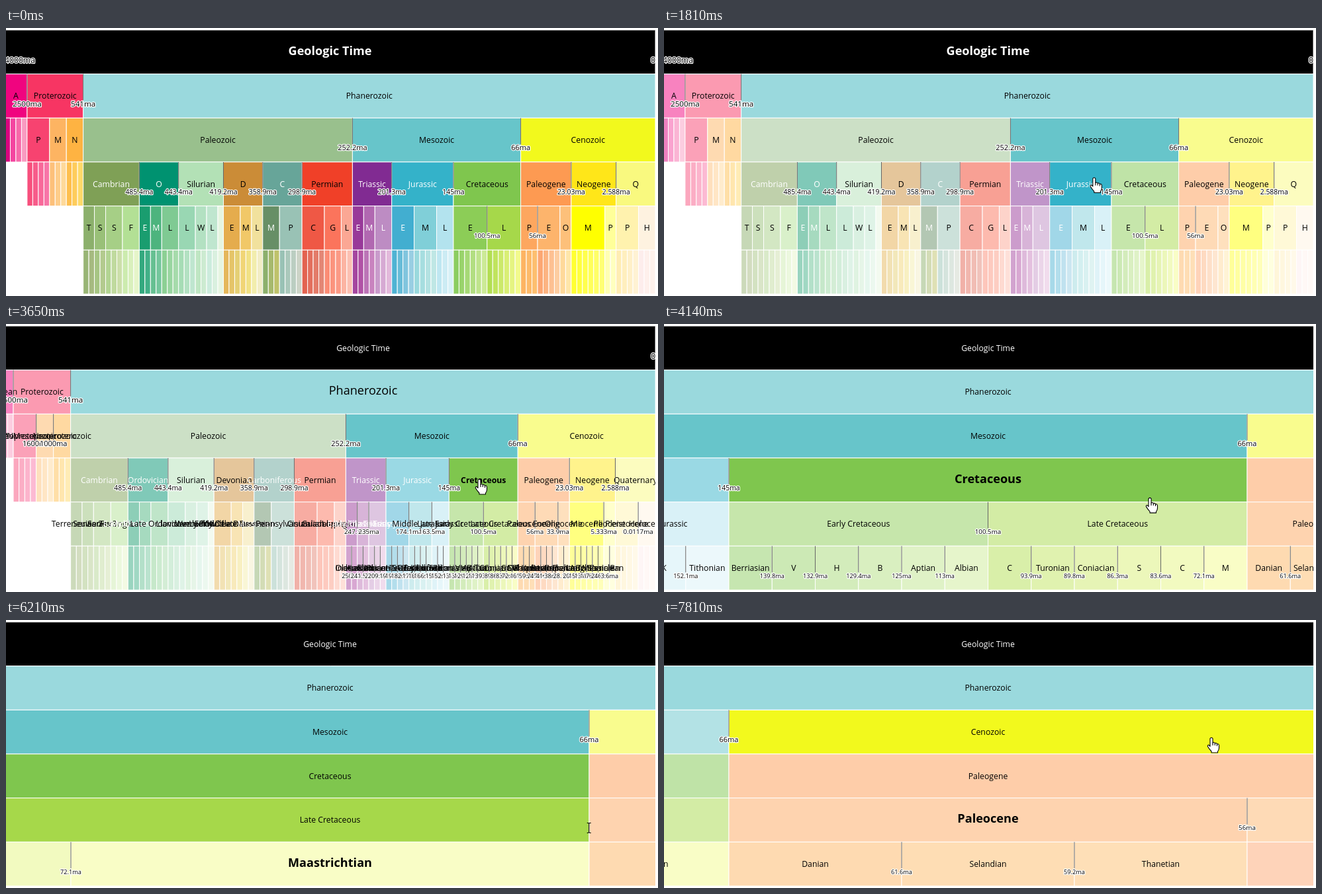
An HTML page with a canvas that plays this animation: 985x406 px, repeating every 8 s.

```html
<!DOCTYPE html>
<html lang="en">
<head>
<meta charset="utf-8">
<title>Geologic Time</title>
<style>
html, body { margin: 0; width: 100%; height: 100%; overflow: hidden; background: #fff; }
canvas { display: block; width: 985px; height: 406px; }
</style>
</head>
<body>
<canvas id="stage"></canvas>
<script>
const WIDTH = 985, HEIGHT = 406, LOOP = 8000;
const LEFT = -2, RIGHT = 981, MARGIN = 100;
const TOP = 3, ROW = 400 / 6;
const ZOOM_MS = 400, HOVER_LAG = 60;
const SMALL = 12.25, LARGE = 18.1, FAMILY = '"Open Sans", "Noto Sans", sans-serif';

// Indent = level. Name, colour, start age; then the colour ramp and the stages (or their count).
// "*" marks white text, "+" a name that needs extra room.
const CHART = `
Geologic Time* 000000
 Archean F0047F
  Eoarchean DA037F
  Paleoarchean F4449F
  Mesoarchean F768A9
  Neoarchean F99BC1
 Proterozoic F73563 2500
  Paleoproterozoic F74370 | F74F7C F875A7 4
  Mesoproterozoic FDB462 1600 | FDC07A FED99A 3
  Neoproterozoic FEB342 1000 | FEBF4E FED96A 3
 Phanerozoic 9AD9DD 541
  Paleozoic 99C08D
   Cambrian* 7FA056
    Terreneuvian 8CB06C | 99B575 A6BA80 2
    Series 2 99C078 | A6C583 B3CA8E 2
    Series 3 A6CF86 | B3D492 CCDFAA 3
    Furongian B3E095 | CCEBAE E6F5C9 3
   Ordovician* 009270 485.4
    Early Ordovician* 1A9D6F | 33A97E 41B087 2
    Middle Ordovician* 4DB47E | 66C092 74C69C 2
    Late Ordovician 7FCA93 | 8CD094 A6DBAB 3
   Silurian B3E1B6 443.4
    Llandovery 99D7B3 | A6DCB5 BFE6CF 3
    Wenlock B3E1C2 | BFE6C3 CCEBD1 2
    Ludlow BFE6CF | CCECDD D9F0DF 2
    Pridoli E6F5E1 | E6F5E1 E6F5E1 1
   Devonian+ CB8C37 419.2
    Early Devonian E5AC4D | E5B75A E5D075 3
    Middle Devonian F1C868 | F1D576 F1E185 2
    Late Devonian F1E19D | F2EDAD F2EDC5 2
   Carboniferous* 67A599 358.9
    Mississippian* 678F66 | 8CB06C BFC26B 3
    Pennsylvanian 99C2B5 | 99C2B5 CCD4C7 4
   Permian F04028 298.9
    Cisuralian EF5845 | E36350 E38776 4
    Guadalupian FB745C | FB8D76 FB9A85 3
    Lopingian FBA794 | FCB4A2 FCC0B2 2
  Mesozoic 67C5CA 252.2
   Triassic* 812B92
    Early Triassic* 983999 | A4469F B051A5 Induan,Olenekian 250
    Middle Triassic* B168B1 247.1 | BC75B7 C983BF Anisian,Ladinian 241.5
    Late Triassic* BD8CC3 235 | C99BCB E3B9DB Carnian,Norian 228,Rhaetian 209.5
   Jurassic* 34B2C9 201.3
    Early Jurassic* 42AED0 | 4EB3D3 99CEE3 Hettangian,Sinemurian 199.3,Pliensbachian 190.8,Toarcian 182.7
    Middle Jurassic 80CFD8 174.1 | 9AD9DD BFE7E5 Aalenian,Bajocian 170.3,Bathonian 168.3,Callovian 166.1
    Late Jurassic B3E3EE 163.5 | BFE7F1 D9F1F7 Oxfordian,Kimmeridgian 157.3,Tithonian 152.1
   Cretaceous 7FC64E 145
    Early Cretaceous 8CCD57 | 8CCD60 CCEA97 Berriasian,Valanginian 139.8,Hauterivian 132.9,Barremian+ 129.4,Aptian 125,Albian 113
    Late Cretaceous A6D84A 100.5 | B3DE53 F2FA8C Cenomanian,Turonian 93.9,Coniacian 89.8,Santonian+ 86.3,Campanian 83.6,Maastrichtian 72.1
  Cenozoic F2F91D 66
   Paleogene FD9A52
    Paleocene FDA75F | FDB462 FDBF6F Danian,Selandian 61.6,Thanetian 59.2
    Eocene FDB46C 56 | FCA773 FDCDA1 Ypresian,Lutetian 47.8,Bartonian 41.3,Priabonian 38
    Oligocene FDC07A 33.9 | FED99A FEE6AA Rupelian,Chattian 28.1
   Neogene FFE619 23.03
    Miocene FFFF00 | FFFF33 FFFF73 Aquitanian,Burdigalian 20.44,Langhian 15.97,Serravallian 13.82,Tortonian 11.62,Messinian 7.246
    Pliocene FFFF99 5.333 | FFFFB3 FFFFBF Zanclean,Piacenzian 3.6
   Quaternary F9F97F 2.588
    Pleistocene FFF2AE | FFEDB3 FFF2D3 4
    Holocene FEF2E0 0.0117 | FDEDEC FEF2EC 3`;

const LINE = /^( *)([A-Za-z0-9 ]+)([*+]?) ([\dA-F]{6})(?: ([\d.]+))?(?: \| ([\dA-F]{6}) ([\dA-F]{6}) (.+))?$/;

const lerp = (a, b, p) => a + (b - a) * p;
const rgb = hex => [0, 2, 4].map(i => parseInt(hex.substr(i, 2), 16));
const mix = (a, b, p) => a.map((v, i) => Math.round(lerp(v, b[i], p)));
const css = c => `rgb(${c})`;
const WHITE = [255, 255, 255];

const nodes = [];
const byName = {};

function addNode(parent, name, flag, color, age) {
  const node = {
    parent, name, age, color, kids: [],
    depth: parent ? parent.depth + 1 : 0,
    first: !parent || !parent.kids.length,
    ink: flag === '*' ? '#fff' : '#000',
    pad: flag === '+' ? 10 : 6,
    pale: mix(color, WHITE, 0.5)
  };
  if (parent) parent.kids.push(node);
  nodes.push(node);
  byName[name] = node;
  return node;
}

function addStages(series, from, to, list) {
  const items = /^\d+$/.test(list) ? Array(+list).fill('') : list.split(',');
  items.forEach((item, i) => {
    const [, name, flag, age] = item.match(/^([A-Za-z]*)(\+?) ?([\d.]*)$/);
    const p = items.length > 1 ? i / (items.length - 1) : 0;
    addNode(series, name, flag, mix(rgb(from), rgb(to), p), age);
  });
}

function parse() {
  const path = [];
  for (const line of CHART.trim().split('\n')) {
    const [, indent, name, flag, color, age, from, to, list] = line.match(LINE);
    const depth = indent.length;
    path[depth] = addNode(path[depth - 1], name, flag, rgb(color), age);
    if (list) addStages(path[depth], from, to, list);
  }
}

// Every leaf takes one unit of width.
function partition(node, start) {
  node.a = start;
  node.b = node.kids.length ? node.kids.reduce((at, kid) => partition(kid, at), start) : start + 1;
  return node.b;
}

parse();
const root = nodes[0];
partition(root, 0);

function holds(node, inner) {
  for (; inner; inner = inner.parent) if (inner === node) return true;
  return false;
}

const zooms = [
  [-ZOOM_MS, root],
  [2603, byName.Phanerozoic],
  [3640, byName.Cretaceous],
  [4620, byName['Late Cretaceous']],
  [5450, byName.Maastrichtian],
  [6300, byName.Paleocene]
];

// Time, then the tip of the pointer.
const pointerPath = [
  [300, 1000, 300], [450, 960, 290], [1080, 720, 50], [1200, 700, 60],
  [1810, 650, 227], [1930, 630, 170], [1990, 621, 124], [2300, 619, 121],
  [2670, 619, 121], [2910, 638, 184], [3400, 715, 235], [4000, 715, 235],
  [4140, 734, 263], [4380, 740, 290], [4630, 740, 290], [4870, 756, 345],
  [5350, 800, 372], [6030, 800, 372], [6210, 880.5, 315], [6290, 900, 310],
  [6900, 900, 310], [7070, 1010, 270], [7400, 1010, 240], [7690, 850, 185],
  [7810, 827, 178], [LOOP, 827, 178]
];

function pointerAt(t) {
  const next = pointerPath.findIndex(k => k[0] > t);
  if (next === 0) return [1010, 300];
  const [t0, x0, y0] = pointerPath[next - 1];
  const [t1, x1, y1] = pointerPath[next];
  const p = (t - t0) / (t1 - t0);
  return [lerp(x0, x1, p), lerp(y0, y1, p)];
}

const easeCubic = t => t < 0.5 ? 4 * t ** 3 : 1 - 4 * (1 - t) ** 3;

function zoomAt(t) {
  let i = zooms.length - 1;
  while (zooms[i][0] > t) i--;
  const p = easeCubic(Math.min(1, (t - zooms[i][0]) / ZOOM_MS));
  return { from: zooms[Math.max(0, i - 1)][1], to: zooms[i][1], p };
}

function place(node, focus) {
  const lo = focus.a === root.a ? LEFT : LEFT + MARGIN;
  const hi = focus.b === root.b ? RIGHT : RIGHT - MARGIN;
  const k = (hi - lo) / (focus.b - focus.a);
  const x0 = lo + (node.a - focus.a) * k;
  const x1 = lo + (node.b - focus.a) * k;
  return {
    x0, x1,
    cx: holds(node, focus) ? (lo + hi) / 2 : (x0 + x1) / 2,
    size: node === focus ? LARGE : SMALL
  };
}

function layout({ from, to, p }) {
  return nodes.map(node => {
    const a = place(node, from), b = place(node, to);
    const cell = { node, y: TOP + node.depth * ROW, room: b.x1 - b.x0 };
    for (const key in b) cell[key] = lerp(a[key], b[key], p);
    return cell;
  });
}

const canvas = document.getElementById('stage');
const ctx = canvas.getContext('2d');
const ratio = window.devicePixelRatio || 1;
canvas.width = WIDTH * ratio;
canvas.height = HEIGHT * ratio;

function textWidth(text, size) {
  ctx.font = `${size}px ${FAMILY}`;
  return ctx.measureText(text).width;
}

function drawCell({ node, x0, x1, y }, hovered) {
  ctx.fillStyle = css(!hovered || holds(node, hovered) ? node.color : node.pale);
  ctx.fillRect(x0, y, x1 - x0, ROW);
  ctx.strokeStyle = '#fff';
  ctx.lineWidth = 1;
  ctx.strokeRect(x0, y, x1 - x0, ROW);
}

function drawName({ node, cx, y, size, room }, focus) {
  const fits = textWidth(node.name, SMALL) + node.pad < room;
  if (!fits && room < 12) return;
  ctx.font = `${node === focus ? 700 : 400} ${size}px ${FAMILY}`;
  ctx.textAlign = 'center';
  ctx.fillStyle = node.ink;
  ctx.fillText(fits ? node.name : node.name.charAt(0), cx, y + ROW / 2 + 4.3);
}

function drawTick(x, y, depth, label, align) {
  const size = 12.2 - 0.6 * depth;
  const base = y + 45.2 + 0.36 * size;
  ctx.strokeStyle = '#666';
  ctx.lineWidth = 1;
  ctx.beginPath();
  ctx.moveTo(x, y);
  ctx.lineTo(x, y + 40);
  ctx.stroke();
  ctx.font = `${size}px ${FAMILY}`;
  ctx.textAlign = align;
  ctx.lineJoin = 'round';
  ctx.lineWidth = 2.5;
  ctx.strokeStyle = '#fff';
  ctx.strokeText(label, x, base);
  ctx.fillStyle = '#000';
  ctx.fillText(label, x, base);
}

function drawAge({ node, x0, y, room }) {
  if (node.first || !node.age) return;
  const label = node.age + 'ma';
  if (textWidth(label, 12.2 - 0.6 * node.depth) + 4 < room) drawTick(x0, y, node.depth, label, 'center');
}

const hand = new Path2D('M-2 1.5 Q0 -1 2 1.5 V8 Q4 6.5 5.3 8.8 Q7.4 7.6 8.5 10 Q11 9 11.5 12 V16 Q11.3 19 9.5 21 V23 H0 V21 Q-3 18 -5.6 13.5 Q-6 11 -3.8 11.5 L-2 13.4 Z');
const fingers = new Path2D('M2 8 V12 M5.3 9 V12 M8.5 10 V13');
const beam = new Path2D('M-3 -7.5 H-1 L0 -6.5 L1 -7.5 H3 M0 -6.5 V6.5 M-3 7.5 H-1 L0 6.5 L1 7.5 H3');

function drawPointer(t) {
  const [x, y] = pointerAt(t);
  ctx.save();
  ctx.translate(x, y);
  ctx.strokeStyle = '#000';
  ctx.lineWidth = 1.1;
  if (t > 6150 && t < 6260) {
    ctx.stroke(beam);
  } else {
    ctx.fillStyle = '#fff';
    ctx.fill(hand);
    ctx.stroke(hand);
    ctx.stroke(fingers);
  }
  ctx.restore();
}

function hoveredAt(t, cells) {
  const [x, y] = pointerAt(Math.max(0, t - HOVER_LAG));
  if (x > RIGHT) return null;
  const hit = cells.find(c => x >= c.x0 && x < c.x1 && y >= c.y && y < c.y + ROW);
  return hit ? hit.node : null;
}

function draw(t) {
  const zoom = zoomAt(t);
  const cells = layout(zoom);
  const hovered = hoveredAt(t, cells);
  ctx.setTransform(ratio, 0, 0, ratio, 0, 0);
  ctx.fillStyle = '#fff';
  ctx.fillRect(0, 0, WIDTH, HEIGHT);
  ctx.save();
  ctx.beginPath();
  ctx.rect(0, 0, RIGHT, HEIGHT);
  ctx.clip();
  const seen = cells.filter(c => c.x1 > -60 && c.x0 < RIGHT + 60);
  seen.forEach(c => drawCell(c, hovered));
  seen.forEach(c => drawName(c, zoom.to));
  seen.forEach(drawAge);
  const whole = cells[0];
  drawTick(whole.x0, TOP, 0, '4000ma', zoom.to === root ? 'left' : 'center');
  drawTick(whole.x1, TOP, 0, '0', 'right');
  drawPointer(t);
  ctx.restore();
}

const begin = performance.now();
function tick() {
  draw((performance.now() - begin) % LOOP);
  requestAnimationFrame(tick);
}
tick();
</script>
</body>
</html>
```
